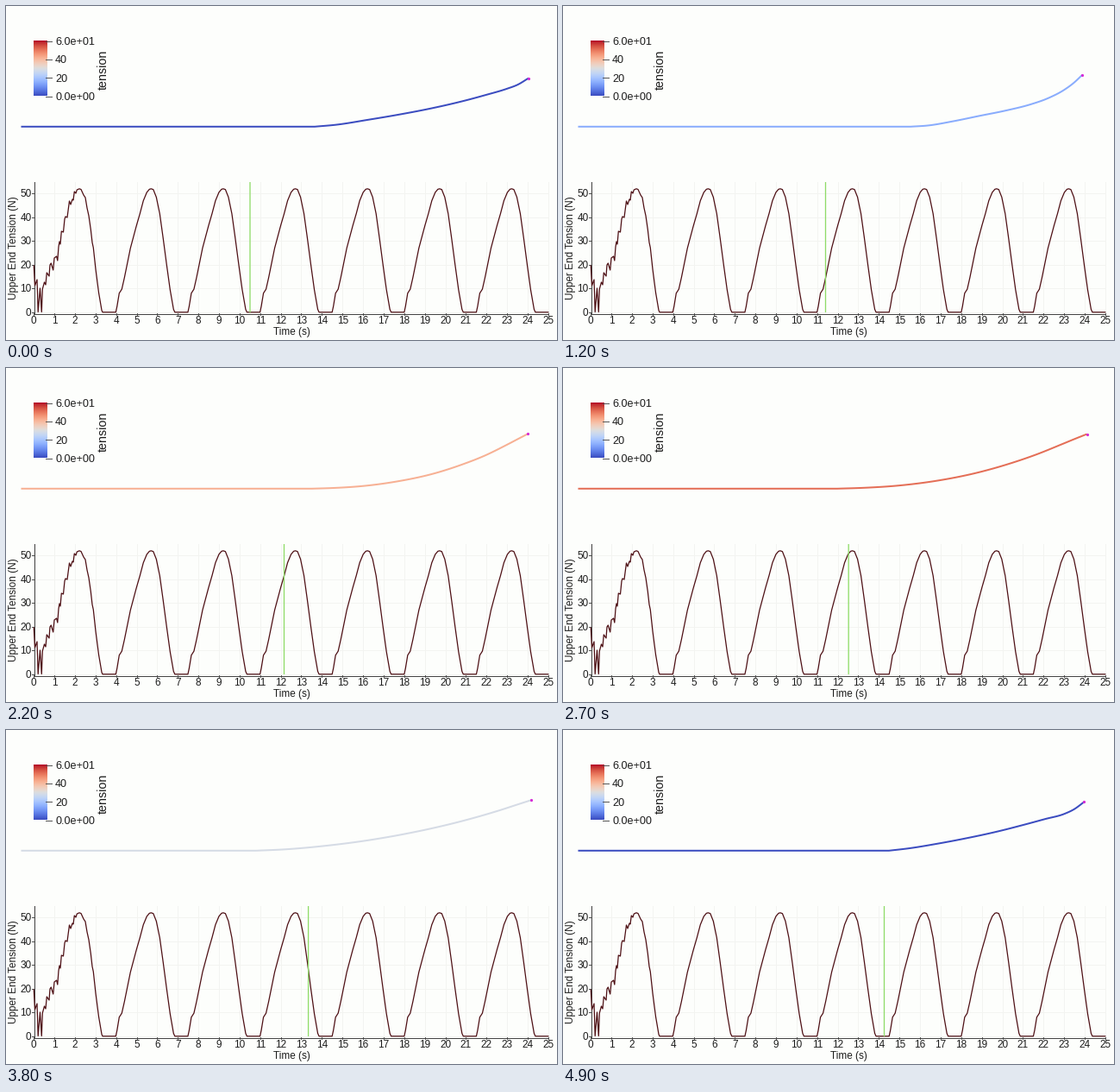
A matplotlib script for the animation above (5 s loop, 639 by 387 pixels).

```python
import numpy as np
import matplotlib.pyplot as plt
from matplotlib.animation import FuncAnimation

W, H = 639, 387
FRAMES, INTERVAL = 50, 100
X0, Y0 = 32.3, 354.8            # chart origin in pixels
PX_S, PX_N = 23.86, 2.75        # pixels per second, per newton
PERIOD, FIRST_PEAK = 3.505, 5.7
FLOOR = 139.8                   # height of the seabed line
CMAP = plt.get_cmap("coolwarm")
INK = "#1c1c1c"

# One tension pulse: pixels from the peak, newtons
PULSE = np.array([
    (-41, 0), (-39.5, 2.5), (-37, 8), (-34, 9.7), (-31, 14.5), (-24, 27),
    (-17, 36.5), (-13, 41.5), (-9, 47), (-5, 50.5), (-2, 51.8), (0, 52),
    (2.5, 51.7), (6, 48.5), (10, 41.5), (14, 31), (18, 20), (22, 9.5),
    (26, 1.2), (27.5, 0)])

# Noisy start-up, in stage pixels
STARTUP = [
    (32.3, 301), (33.5, 324), (36, 317), (37.2, 354.5), (39.5, 327),
    (41.3, 354.5), (42.3, 328), (44.5, 320), (46, 323), (47.3, 309),
    (50, 313), (51, 300), (52.3, 298), (54.7, 306), (56, 292), (58.6, 290),
    (59.8, 295), (61, 279), (62, 273), (63, 276), (64.3, 261), (66.5, 262),
    (68, 247), (69, 244), (71, 245), (73.5, 226), (75, 230), (77, 224),
    (78, 225), (79.3, 215), (81, 217), (82.3, 213), (85, 211.8), (87, 212.5),
    (90, 219), (92, 222), (94, 234), (96, 243), (98.3, 259), (100, 274),
    (101.3, 280), (104, 305), (107.5, 332), (111, 352.5), (112, 354.8)]

# Pose keys: frame, cursor x, touchdown x, rise at each fraction in U
U = np.array([0, .1, .25, .4, .55, .7, .8, .9, .95, 1])
POSES = np.array([
    (0, 283, 358, 0, 2.2, 8.0, 14.3, 21.5, 30.1, 36.8, 44.1, 48.8, 56.3),
    (5, 291.5, 385, 0, 2.4, 7.8, 14.2, 21.6, 29.5, 34.8, 41.4, 47.2, 56.8),
    (12, 304.5, 403, 0, 1.3, 6.3, 12.4, 18.4, 25.8, 32.8, 43.2, 50.5, 59.8),
    (22, 322.5, 355, 0, 0.8, 3.4, 8.6, 16.5, 28.3, 38.1, 50.3, 56.8, 63.3),
    (33, 341.6, 285, 0, 1.2, 4.8, 10.8, 19.5, 30.8, 40.0, 50.2, 55.5, 60.8),
    (43, 359.6, 318, 0, 1.8, 6.6, 12.8, 20.5, 30.0, 37.3, 45.8, 51.1, 56.8),
    (49, 372.5, 378, 0, 2.6, 8.1, 14.5, 21.8, 30.4, 36.5, 42.6, 48.0, 56.3)])


def hermite(x, knots, values):
    """Smooth curve through the knots."""
    slopes = np.gradient(values, knots, axis=0)
    i = np.clip(np.searchsorted(knots, x, side="right") - 1, 0, len(knots) - 2)
    h = knots[i + 1] - knots[i]
    s = (x - knots[i]) / h
    return ((1 + 2 * s) * (1 - s) ** 2 * values[i]
            + s * (1 - s) ** 2 * h * slopes[i]
            + s * s * (3 - 2 * s) * values[i + 1]
            + s * s * (s - 1) * h * slopes[i + 1])


def tension(t):
    peak = FIRST_PEAK + PERIOD * round((t - FIRST_PEAK) / PERIOD)
    return np.interp((t - peak) * PX_S, PULSE[:, 0], PULSE[:, 1])


fig = plt.figure(figsize=(W / 72, H / 72), dpi=72, facecolor="#fdfefc")
ax = fig.add_axes([0, 0, 1, 1])
ax.axis("off")


def line(xs, ys, color, width, **kw):
    return ax.plot(xs, ys, color=color, lw=width, **kw)[0]


def label(x, y, text, size=11.7, ha="center", rotation=0):
    ax.text(x, y, text, size=size, ha=ha, va="baseline", color=INK,
            family="Liberation Sans", rotation=rotation,
            rotation_mode="anchor")


# Colour legend
ax.imshow(np.linspace(1, 0, 256)[:, None], cmap=CMAP, aspect="auto",
          extent=(32, 48, 104.5, 41), interpolation="bilinear")
for i, text in enumerate(("0.0e+00", "20", "40", "6.0e+01")):
    y = 104.5 - 21.17 * i
    line((46, 53), (y, y), "#555555", 1)
    label(57, y + 4.3, text, 12.6, "left")
label(117, 74, "tension", 14.3, rotation=90)

# Chart frame, grid and ticks
for s in range(26):
    x = X0 + s * PX_S
    line((x, x), (204, 355), "#f3f4f1", 1)
    line((x, x), (356, 358), INK, 0.8)
    label(x, 368.3, str(s))
for n in range(0, 51, 10):
    y = Y0 - n * PX_N
    line((32, 629), (y, y), "#f3f4f1", 1)
    line((29.5, 32), (y, y), INK, 0.8)
    label(29.5, y + 3.8, str(n), ha="right")
line((32.5, 32.5), (204, 356), "#444444", 1)
line((32, 629), (356.5, 356.5), "#444444", 1)
label(331, 381, "Time (s)")
label(12, 280, "Upper End Tension (N)", rotation=90)

# Tension curve
curve = list(STARTUP)
for k in range(6):
    peak = X0 + (FIRST_PEAK + k * PERIOD) * PX_S
    curve += [(peak + dx, Y0 - n * PX_N) for dx, n in PULSE]
curve.append((X0 + 25 * PX_S, Y0))
line(*zip(*curve), "#4d0f14", 1.25, zorder=4, solid_joinstyle="round")

cursor = line([], [], "#8fdc68", 1.3, zorder=5, snap=False,
              solid_capstyle="butt")
rope = line([], [], "blue", 2, zorder=4, solid_capstyle="butt")
tip = line([], [], "#d62ad6", 0, marker="o", ms=3.2, mew=0, zorder=5)
ax.set_xlim(0, W)
ax.set_ylim(H, 0)

fractions = np.linspace(0, 1, 120)


def update(frame):
    x = np.interp(frame, POSES[:, 0], POSES[:, 1])
    t = (x - X0) / PX_S
    cursor.set_data((x, x), (204, 355))

    # The upper end runs round a small circle
    angle = 2 * np.pi * (t - 10.52) / PERIOD
    end_x = 605.9 - 3.7 * np.sin(angle)
    end_y = 79.9 + 3.7 * np.cos(angle)

    pose = hermite(frame, POSES[:, 0], POSES[:, 2:])
    touch, rise = pose[0], pose[1:]
    rise = rise * (FLOOR - end_y) / rise[-1]
    xs = touch + (end_x - touch) * fractions
    ys = FLOOR - hermite(fractions, U, rise)
    rope.set_data(np.r_[17.5, xs], np.r_[FLOOR, ys])
    rope.set_color(CMAP(tension(t) / 60))
    tip.set_data([end_x], [end_y])
    return cursor, rope, tip


anim = FuncAnimation(fig, update, frames=FRAMES, interval=INTERVAL,
                     repeat=True, repeat_delay=0)
plt.show()
```
